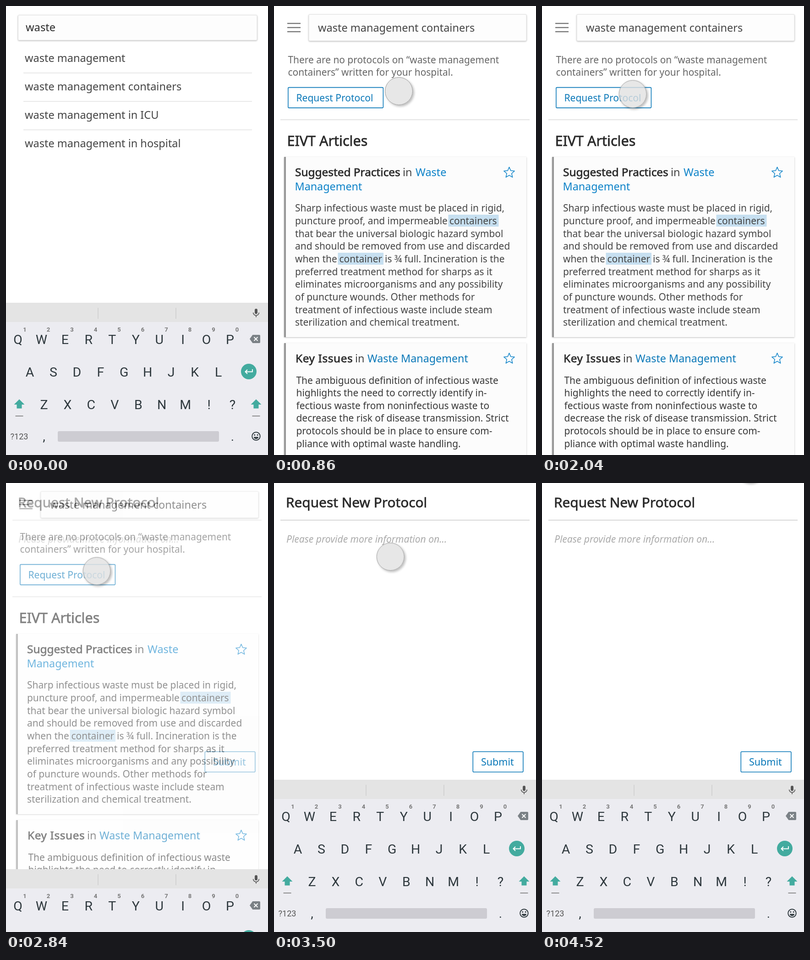
Recreate the animation shown at these times as an HTML page. Size 572 by 979 pixels, loop 4.64 s.

```html
<!DOCTYPE html>
<html lang="en">
<head>
<meta charset="utf-8">
<title>Protocol search</title>
<style>
  html, body { margin: 0; width: 100%; height: 100%; overflow: hidden; background: #fff; }
  body { position: relative; }
  svg { position: absolute; left: 0; top: 0; display: block; }
  text { font-family: "Noto Sans", sans-serif; fill: currentColor; white-space: pre; }
  .medium { stroke: currentColor; stroke-width: .75px; }
  .italic { font-style: italic; }
  .spaced { letter-spacing: .6px; }
  .key { font-family: Roboto, sans-serif; text-anchor: middle; }
  .hint { font-weight: 700; }
  .raised { filter: drop-shadow(.5px 1px 1.5px rgba(0, 0, 0, .28)); }
  .outline { fill: none; stroke: #0a78b8; stroke-width: 1.6px; }
  #cursor {
    position: absolute; left: 0; top: 0; width: 61px; height: 61px;
    box-sizing: border-box; border: 1.6px solid #989898; border-radius: 50%;
    background: rgba(225, 225, 225, .8);
    box-shadow: 3px 3px 5px rgba(0, 0, 0, .26);
    offset-path: path("M453 -31 L272.5 185.5 L198 192 Q329 130 453 -31");
    offset-rotate: 0deg;
  }
</style>
</head>
<body>
<svg width="572" height="979" viewBox="0 0 572 979">
  <g id="results"></g>
  <g id="request"></g>
  <g id="search"></g>
  <g id="keyboard"></g>
</svg>
<div id="cursor"></div>
<script>
const LOOP = 4640;
const LINK = '#0a78b8', TITLE_LINK = '#0c82c8', DARK = '#2b2b2b', BODY = '#444', TEAL = '#43ab9f';
const $ = id => document.getElementById(id);

const text = (x, y, size, str, color = BODY, cls = '') =>
  `<text x="${x}" y="${y}" font-size="${size}" color="${color}" class="${cls}">${str}</text>`;
const rect = (x, y, w, h, fill, attrs = '') =>
  `<rect x="${x}" y="${y}" width="${w}" height="${h}" fill="${fill}" ${attrs}/>`;
const path = (d, stroke, width, attrs = 'fill="none"') =>
  `<path d="${d}" stroke="${stroke}" stroke-width="${width}" ${attrs}/>`;
const rule = (x1, x2, y, color) => path(`M${x1} ${y}H${x2}`, color, 1.5);
const field = (x, y, w, h) =>
  rect(x, y, w, h, '#fdfdfd', 'rx="2" stroke="#e2e2e2" class="raised"');
const button = (x, y, w, label, labelX, size) =>
  rect(x, y, w, 44.5, 'none', 'rx="2" class="outline"') + text(labelX, y + 30, size, label, LINK);
const lines = (x, y, rows, color) =>
  rows.map((row, i) => text(x, (y + i * 27.65).toFixed(2), 20.9, row, color)).join('');
const page = rect(0, 0, 572, 979, '#fff');

const card = (y, h) =>
  rect(22, y, 529, h, '#fcfcfc', 'class="raised"') + rect(22, y, 4, h, '#979797');

function star(cx, cy) {
  const points = Array.from({ length: 10 }, (_, i) => {
    const r = i % 2 ? 5.6 : 12.2, a = i * Math.PI / 5;
    return `${(cx + r * Math.sin(a)).toFixed(1)},${(cy - r * Math.cos(a)).toFixed(1)}`;
  });
  return `<polygon points="${points.join(' ')}" fill="none" stroke="${TITLE_LINK}" stroke-width="1.5" stroke-linejoin="round"/>`;
}

function searchPage() {
  const suggestions = ['', ' containers', ' in ICU', ' in hospital'];
  return page + field(26.5, 20, 521.5, 54.5) + text(43, 55, 23.7, 'waste', DARK) +
    suggestions.map((s, i) => text(41, 122 + i * 62, 23.5, 'waste management' + s)).join('') +
    [146, 208, 270].map(y => rule(38, 537, y, '#e2e2e2')).join('');
}

function resultsPage() {
  const mark = (x, y, w) => rect(x, y, w, 26, '#c6dff0');
  return page +
    [38, 47, 56].map(y => path(`M29 ${y}H58`, '#777', 2.4)).join('') +
    field(76, 18.5, 475, 57.5) + text(96, 56, 23.5, 'waste management containers') +
    lines(30.5, 124.7, ['There are no protocols on “waste management', 'containers” written for your hospital.'], '#666') +
    button(30.8, 177.6, 207.6, 'Request Protocol', 48.5, 21) +
    rule(14, 558, 248, '#dadada') +
    text(28.5, 304.5, 30.5, 'EIVT Articles', DARK, 'medium') +

    card(329, 393) + star(513.5, 363.5) +
    text(46, 370.5, 24.4, 'Suggested Practices', DARK, 'medium') +
    text(281, 370.5, 23.5, 'in') + text(309, 370.5, 23.5, 'Waste', TITLE_LINK) +
    text(45.5, 402.3, 23.3, 'Management', TITLE_LINK) +
    mark(380.5, 455, 110) + mark(139.5, 538, 99.5) +
    lines(46, 448.3, [
      'Sharp infectious waste must be placed in rigid,',
      'puncture proof, and impermeable',
      'that bear the universal biologic hazard symbol',
      'and should be removed from use and discarded',
      'when the',
      'preferred treatment method for sharps as it',
      'eliminates microorganisms and any possibility',
      'of puncture wounds. Other methods for',
      'treatment of infectious waste include steam',
      'sterilization and chemical treatment.'], BODY) +
    text(383, 475.95, 20.9, 'containers') + text(142.5, 558.9, 20.9, 'container') +
    text(242, 558.9, 20.9, 'is ¾ full. Incineration is the') +

    card(735, 260) + star(513.5, 769) +
    text(47, 777.2, 24.4, 'Key Issues', DARK, 'medium spaced') +
    text(177, 777.2, 23.5, 'in') + text(204, 777.2, 23.3, 'Waste Management', LINK) +
    lines(48.5, 823.5, [
      'The ambiguous definition of infectious waste',
      'highlights the need to correctly identify in-',
      'fectious waste from noninfectious waste to',
      'decrease the risk of disease transmission. Strict',
      'protocols should be in place to ensure com-',
      'pliance with optimal waste handling.'], '#383838');
}

function requestPage() {
  return page + text(26, 53, 29.8, 'Request New Protocol', DARK, 'medium') +
    rule(14, 558, 81, '#cbcbcb') +
    text(27, 130, 21, 'Please provide more information on...', '#ababab', 'italic') +
    button(434.3, 585.8, 109.6, 'Submit', 452, 21.5);
}

function keyboard() {
  const ink = '#2e383d', grey = '#777';
  const row = (keys, x, y) =>
    [...keys].map((k, i) => text(x + i * 51.45, y, 28.5, k, ink, 'key')).join('');
  const hints = [...'1234567890'].map((d, i) => text(41 + i * 51.5, 709.5, 13, d, grey, 'key hint')).join('');
  const shift = x =>
    `<path d="M${x} 857.5l11.5 11.5h-6v8.5h-11v-8.5h-6z" fill="${TEAL}"/>` + path(`M${x - 8.5} 894h17`, grey, 1.6);
  const mic = rect(543, 660, 6, 11.5, '#555', 'rx="3"') +
    path('M539.7 668.5a6.3 6.3 0 0 0 12.6 0M546 675v3.5', '#555', 1.7);
  const backspace = `<path d="M538.5 717H553q2 0 2 2v14q0 2-2 2h-14.5L532 726z" fill="#7b8186"/>` +
    path('M541.5 722l8 8m0-8l-8 8', '#fff', 1.8);
  const enter = `<circle cx="530" cy="797" r="17" fill="${TEAL}"/>` +
    path('M538 792v5.5h-15.5m4.5-4.5l-4.5 4.5l4.5 4.5', '#fff', 1.9);
  const smiley = `<circle cx="546" cy="938" r="8.8" fill="none" stroke="${ink}" stroke-width="1.9"/>` +
    `<circle cx="542.8" cy="935.3" r="1.5" fill="${ink}"/><circle cx="549.2" cy="935.3" r="1.5" fill="${ink}"/>` +
    `<path d="M540.8 939.5h10.4a5.2 4.6 0 0 1-10.4 0z" fill="${ink}"/>`;

  return rect(0, 689, 572, 290, '#ececf1') + rect(0, 647, 572, 42, '#e4e4e4') +
    path('M201 658v24M371 658v24', '#c9c9c9', 1.3) + mic + hints +
    row('QWERTYUIOP', 26, 736.5) + row('ASDFGHJKL', 52, 807.5) + row('ZXCVBNM!?', 83, 878.5) +
    backspace + enter + shift(29) + shift(546) +
    text(29, 945, 18, '?123', '#555', 'key') + text(83, 947.5, 28, ',', ink, 'key') +
    rect(113, 927, 352, 23, '#cdccd2', 'rx="3"') + text(494.5, 947.5, 26, '.', ink, 'key') + smiley;
}

$('search').innerHTML = searchPage();
$('results').innerHTML = resultsPage();
$('request').innerHTML = requestPage();
$('keyboard').innerHTML = keyboard();

// Each key is [ms, value, easing towards the next key].
function track(id, prop, keys, easing = 'linear') {
  const last = keys[keys.length - 1][1];
  const frames = [...keys, [LOOP, last]].map(([ms, value, ease = easing]) =>
    ({ offset: ms / LOOP, [prop]: value, easing: ease }));
  $(id).animate(frames, { duration: LOOP, iterations: Infinity }).startTime = 0;
}
// Steps land slightly early so that each is in place at its stated time.
const hold = (id, prop, keys) =>
  track(id, prop, keys.map(([ms, v]) => [Math.max(0, ms - 4), v]), 'step-end');
const slide = y => `translateY(${y}px)`;

hold('search', 'opacity', [[0, 1], [800, .75], [820, .5], [840, .25], [860, 0]]);
hold('request', 'opacity', [[0, 0], [2800, .1], [2840, .41], [2860, .9], [2940, 1]]);
hold('keyboard', 'transform', [
  [0, slide(0)], [800, slide(83)], [820, slide(166)], [840, slide(249)], [860, slide(332)],
  [2800, slide(300)], [2840, slide(195)], [2860, slide(33)], [2940, slide(0)]]);

track('cursor', 'offsetDistance', [
  [0, '0px'],
  [40, '0px', 'cubic-bezier(.06, .8, .7, .94)'],
  [590, '281.9px'],
  [1530, '281.9px', 'ease-in-out'],
  [1850, '356.7px'],
  [3200, '356.7px', 'cubic-bezier(.3, .06, .94, .2)'],
  [3760, '699px']]);
track('cursor', 'opacity', [
  [0, 0, 'step-end'], [50, 1, 'step-end'], [3756, 0, 'step-end'], [4150, .4], [4260, 1]]);
</script>
</body>
</html>
```
